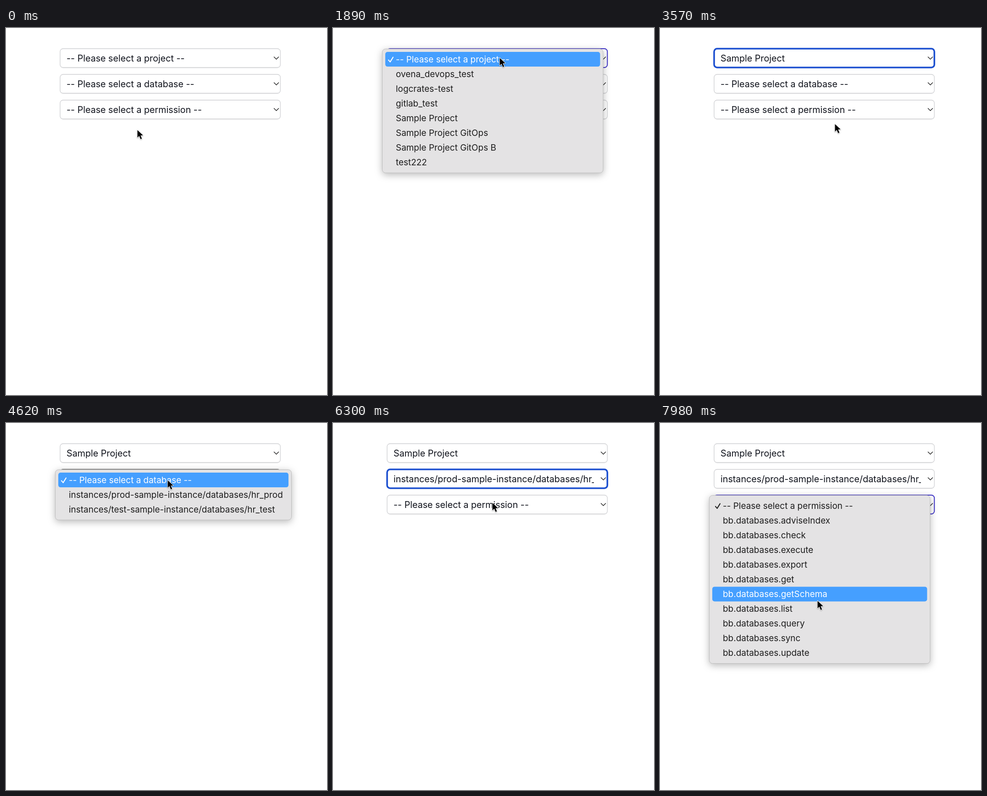
Recreate the animation shown at these times as an HTML page. Size 700x799 px, loop 8000 ms.

```html
<!DOCTYPE html>
<html lang="en">
<head>
<meta charset="utf-8">
<title>Permission picker</title>
<style>
  html, body { margin: 0; width: 100%; height: 100%; overflow: hidden; background: #fff; }
  svg { display: block; width: 700px; height: 799px; font-family: Inter, "Liberation Sans", sans-serif; }
  .field text { font-size: 19.7px; fill: #10131c; }
  .menu text { font-size: 18.95px; fill: #1d1d1d; }
  .menu .on text { fill: #fff; }
  .menu .bar { fill: #459fff; visibility: hidden; }
  .menu .on .bar { visibility: visible; }
  .tick { fill: none; stroke: #1d1d1d; stroke-width: 2; stroke-linecap: round; stroke-linejoin: round; }
  .on .tick { stroke: #fff; }
  .panel { fill: #e4e3e4; stroke: #bdbdbd; filter: drop-shadow(0 4px 8px rgba(0, 0, 0, .27)); }
  .box { fill: #fff; stroke: #d0d1d4; stroke-width: 1.3; filter: drop-shadow(0 1px .5px rgba(0, 0, 0, .06)); }
  .ring { fill: none; }
  .chevron { fill: none; stroke: #222; stroke-width: 1.4; stroke-linecap: round; stroke-linejoin: round; }
  #cursor { filter: drop-shadow(0 1.5px 1.2px rgba(0, 0, 0, .35)); }
  #cursor path { fill: #000; stroke: #fff; stroke-width: 1.7; stroke-linejoin: round; paint-order: stroke; }
</style>
</head>
<body>
<svg id="stage" viewBox="0 0 700 799">
  <defs><clipPath id="fieldClip"><rect x="118" y="0" width="451" height="300"/></clipPath></defs>
</svg>
<script>
const LOOP = 8000, STEP = 70, ROW = 32.05, FLASH = 70, FADE = 140;
const stage = document.getElementById('stage');

function add(parent, tag, attrs = {}, text) {
  const node = document.createElementNS('http://www.w3.org/2000/svg', tag);
  for (const key in attrs) node.setAttribute(key, attrs[key]);
  if (text) node.textContent = text;
  return parent.appendChild(node);
}

const perms = ['adviseIndex', 'check', 'execute', 'export', 'get', 'getSchema',
  'list', 'query', 'sync', 'update'].map(name => 'bb.databases.' + name);

// open: menu appears, click: chosen row blinks and the menu fades, blur: focus moves on
const fields = [
  { top: 45, width: 481.5, open: 1890, click: 3150, blur: 4410, pick: 4, edge: '#4338ca',
    options: ['-- Please select a project --', 'ovena_devops_test', 'logcrates-test', 'gitlab_test',
      'Sample Project', 'Sample Project GitOps', 'Sample Project GitOps B', 'test222'] },
  { top: 101, width: 515, open: 4410, click: 5740, blur: 7000, pick: 1, edge: '#666',
    options: ['-- Please select a database --',
      'instances/prod-sample-instance/databases/hr_prod',
      'instances/test-sample-instance/databases/hr_test'] },
  { top: 157, width: 481.5, open: 7000, click: Infinity, blur: Infinity, pick: 0, edge: '#4338ca',
    options: ['-- Please select a permission --', ...perms] }
];

function buildField(f) {
  const g = add(stage, 'g', { class: 'field' });
  const frame = { x: 118, y: f.top, width: 480.3, height: 41, rx: 6.5 };
  add(g, 'rect', { class: 'box', ...frame });
  f.label = add(g, 'text', { x: 132, y: f.top + 27.6, 'clip-path': 'url(#fieldClip)' });
  add(g, 'path', { class: 'chevron', d: `M584.5 ${f.top + 18}l5 5l5-5` });
  f.ring = add(g, 'rect', { class: 'ring', ...frame });
}

function buildMenu(f) {
  f.menu = add(stage, 'g', { class: 'menu' });
  const height = f.options.length * ROW + 13.3;
  add(f.menu, 'rect', { class: 'panel', x: 107.5, y: f.top + .7, width: f.width, height, rx: 7 });
  f.rows = f.options.map((option, i) => {
    const y = f.top + 7.1 + i * ROW;
    const row = add(f.menu, 'g');
    add(row, 'rect', { class: 'bar', x: 114, y, width: f.width - 13, height: 32, rx: 5 });
    if (!i) add(row, 'path', { class: 'tick', d: `M121 ${y + 17.5}l3.6 4.3l6.4-10.3` });
    add(row, 'text', { x: 137, y: y + 22.8 }, option);
    return row;
  });
}

fields.forEach(buildField);
fields.forEach(buildMenu);
const cursor = add(stage, 'g', { id: 'cursor' });
add(cursor, 'path', { d: 'M.6 1.2V17.6l3.9-3.6 3 6.9 2.8-1.2-2.9-6.7 5.3-.4Z' });

// time, x, y
const path = [
  [0, 286, 221], [560, 361, 66], [700, 361, 66], [770, 363, 64], [1890, 363, 64],
  [2660, 335, 188], [2800, 333, 196], [3290, 333, 196], [3570, 381, 208], [3920, 374, 160],
  [4270, 354, 122], [4410, 354, 122], [4830, 350, 125], [5040, 350, 125], [5460, 348, 142],
  [5950, 348, 142], [6370, 347, 175], [6580, 347, 175], [6860, 345, 182], [7070, 345, 182],
  [7560, 343, 350], [7630, 343, 350], [7980, 343, 386]
];

function cursorAt(t) {
  const next = path.findIndex(p => p[0] > t);
  if (next < 0) return path[path.length - 1].slice(1);
  const [t0, x0, y0] = path[next - 1], [t1, x1, y1] = path[next];
  const k = (t - t0) / (t1 - t0), e = k * k * (3 - 2 * k);
  return [x0 + (x1 - x0) * e, y0 + (y1 - y0) * e];
}

function drawField(f, t, y) {
  const closing = f.click + 2 * FLASH;
  const isOpen = t >= f.open && t < closing + FADE;
  const chosen = t >= closing;
  f.label.textContent = f.options[chosen ? f.pick : 0];

  const focused = t >= f.open && t < f.blur;
  f.ring.setAttribute('visibility', focused ? 'visible' : 'hidden');
  f.ring.setAttribute('stroke', chosen ? '#1d50d0' : f.edge);
  f.ring.setAttribute('stroke-width', chosen ? 3.6 : 2);

  f.menu.style.display = isOpen ? '' : 'none';
  f.menu.setAttribute('opacity', chosen ? Math.max(0, 1 - (t - closing + STEP) / (FADE + STEP)) : 1);
  const blink = t >= f.click && t < f.click + FLASH;
  const hovered = t >= f.click ? f.pick : Math.max(0, Math.floor((y - f.top - 7.1) / ROW));
  f.rows.forEach((row, i) => row.setAttribute('class', i === hovered && !blink ? 'on' : ''));
}

function draw(time) {
  const t = Math.floor((time % LOOP) / STEP) * STEP;
  const [x, y] = cursorAt(t);
  cursor.setAttribute('transform', `translate(${x.toFixed(1)} ${y.toFixed(1)})`);
  fields.forEach(f => drawField(f, t, y));
}

const start = performance.now();
function tick() {
  draw(performance.now() - start);
  requestAnimationFrame(tick);
}
tick();
</script>
</body>
</html>
```
